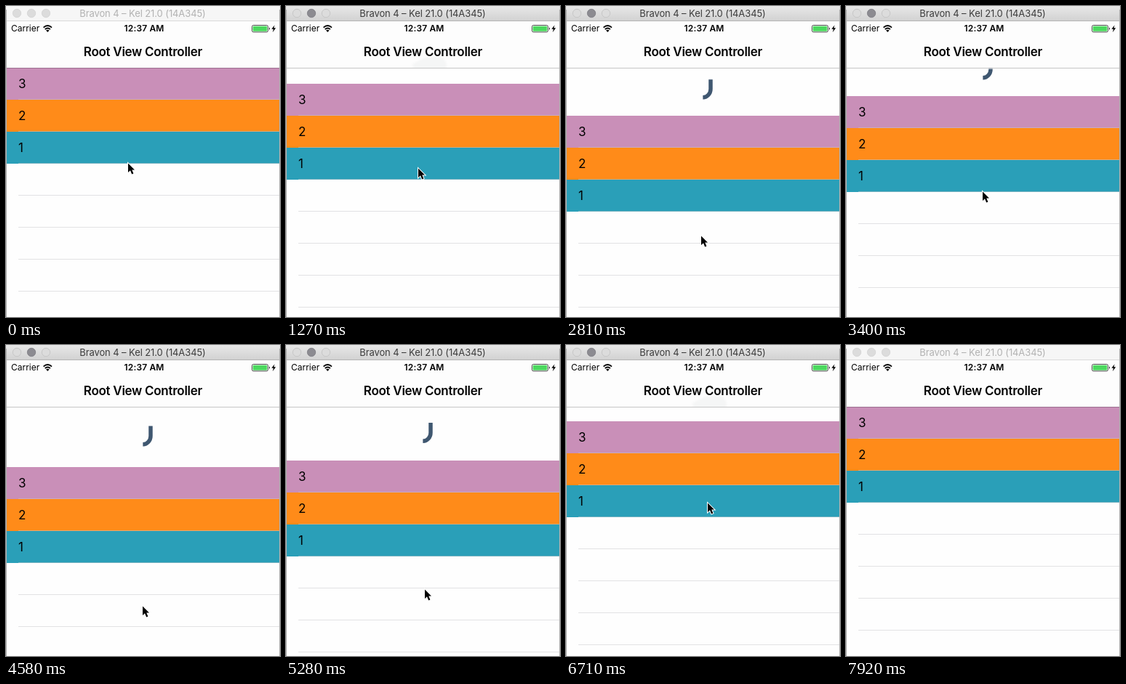
An HTML page for the animation above (8.02 s loop, 377 px wide and 428 px high).

```html
<!DOCTYPE html>
<html lang="en">
<head>
<meta charset="utf-8">
<title>Pull to refresh</title>
<style>
  html, body { margin: 0; width: 100%; height: 100%; overflow: hidden; background: #fefefe; }
  svg { display: block; width: 100vw; height: 100vh; }
  text { font-family: Inter, Roboto, sans-serif; fill: #000; }
  .mid { text-anchor: middle; }
  #window { font-size: 13px; letter-spacing: -.1px; fill: #b2b2b2; }
  .light { fill: #dcdcdc; stroke: #d2d2d2; stroke-width: .8; }
  .active #bar { fill: url(#steel); }
  .active #edge { fill: #b4b4b4; }
  .active #window { fill: #3c3c3c; }
  .active .light { stroke: #c2c2c2; }
  .active #mini { fill: #8c8b91; stroke: #7b7a80; }
</style>
</head>
<body>
<svg id="stage" viewBox="0 0 377 428" preserveAspectRatio="none">
  <defs>
    <linearGradient id="steel" x2="0" y2="1">
      <stop stop-color="#e8e8e8"/><stop offset="1" stop-color="#d2d2d2"/>
    </linearGradient>
    <filter id="soft"><feGaussianBlur stdDeviation="1.5"/></filter>
    <clipPath id="navClip"><rect y="21" width="377" height="64"/></clipPath>
    <path id="hook" pathLength="1" d="M188.4-3.3A10.6 11.5 0 0 0 199-14.8V-28.6"/>
  </defs>

  <rect width="377" height="428" fill="#fefefe"/>
  <g id="spinner" fill="none" stroke-width="5.4">
    <use href="#hook" stroke="#d9dee5"/>
    <use href="#hook" stroke="#3f5770" id="ink"/>
  </g>
  <g id="table"></g>

  <rect y="21" width="377" height="64" fill="#fdfdfd"/>
  <g clip-path="url(#navClip)">
    <path id="haze" d="M174 80L187 73Q203 67 216 71L221 79V88H175Z" fill="#f5f6f6" filter="url(#soft)"/>
  </g>
  <rect y="85" width="377" height="1" opacity=".22"/>
  <text class="mid" x="188.4" y="69" font-size="17" font-weight="600" letter-spacing="-.28">Root View Controller</text>

  <text x="7" y="35.3" font-size="12">Carrier</text>
  <text class="mid" x="190.1" y="35.3" font-size="12" font-weight="600" letter-spacing=".15">12:37 AM</text>
  <g fill="none" stroke="#000" stroke-width="1.9">
    <path d="M51.6 29.6Q57.3 24.6 63 29.6M53.7 32.1Q57.3 28.9 60.9 32.1"/>
    <path d="M55 33.6Q57.3 31.9 59.6 33.6L57.3 36Z" fill="#000" stroke="none"/>
  </g>
  <rect x="338.5" y="26.5" width="22" height="9.4" rx="2" fill="none" stroke="#222" stroke-width=".8"/>
  <rect x="339.7" y="27.7" width="19.6" height="7" rx="1" fill="#4cd95f"/>
  <path d="M362 29.3Q364 31.2 362 33.1Z"/>
  <path d="M369.6 26.2L365.4 31.8H368L366.8 36.2L371.2 30.2H368.5Z"/>

  <rect id="bar" width="377" height="20" fill="#f6f6f6"/>
  <rect id="edge" y="20" width="377" height="1" fill="#dadada"/>
  <circle class="light" cx="15" cy="10" r="5.7"/>
  <circle class="light" id="mini" cx="35" cy="10" r="5.7"/>
  <circle class="light" cx="55" cy="10" r="5.7"/>
  <text class="mid" id="window" x="188" y="15">Bravon 4 – Kel 21.0 (14A345)</text>
  <path d="M.5 5V428M376.5 5V428" stroke="#b3b3b3"/>

  <path id="cursor" d="M1 1.6V14L4 11.3L6.2 16.4L8.4 15.4L6.3 10.5H10Z"
    stroke="#fff" stroke-width="2" paint-order="stroke"/>
</svg>
<script>
const $ = id => document.getElementById(id);
const LOOP = 8020, GRAB = 790, RESUME = 3630, BLUR = 7920;
const TICK = 118.3, TOP = 85, ROW = 44, FULL_PULL = 68;

// Turning points of the drag: time, pointer x, pointer y, pull
const path = [
  [0, 167, 215, 0], [590, 182, 170, 0], [GRAB, 182, 174, 0],
  [1263, 181, 222, 22], [2209, 183, 319, 68], [2564, 184, 340, 77],
  [3392, 187, 254, 39], [4576, 187, 358, 83], [4950, 189, 354, 82],
  [5878, 194, 272, 49], [7297, 194, 176, 0], [LOOP, 194, 176, 0]
];

const colors = ["#c98fb8", "#ff8b19", "#2a9fb8"];
for (let i = 0; i < 8; i++) {
  const y = i * ROW;
  const cell = colors[i] ? `<rect y="${y}" width="377" height="${ROW}" fill="${colors[i]}"/>
    <text x="17" y="${y + 28}" font-size="17">${colors.length - i}</text>` : "";
  $("table").innerHTML += cell +
    `<rect x="17" y="${y + ROW - 1}" width="360" height="1" fill="#c8c7cc" opacity=".5"/>`;
}

// The picture advances in even ticks, restarting after each pause.
function snap(t) {
  const start = t < GRAB ? 0 : t < RESUME ? GRAB : RESUME;
  return start + Math.floor((t - start) / TICK + .001) * TICK;
}

function pose(t) {
  const i = path.findIndex(p => p[0] > t);
  const a = path[i - 1], b = path[i];
  const u = (t - a[0]) / (b[0] - a[0]);
  return a.map((v, n) => Math.round(v + (b[n] - v) * u));
}

const move = (id, x, y) => $(id).setAttribute("transform", `translate(${x} ${y})`);
const show = (id, on) => $(id).setAttribute("visibility", on ? "visible" : "hidden");

function draw(t) {
  const [, x, y, pull] = pose(snap(t));
  const top = TOP + pull;
  move("table", 0, top);
  move("spinner", 0, Math.min(top - 22, (TOP + top) / 2 + 13.5));
  move("cursor", x, y);
  $("ink").setAttribute("stroke-dasharray", `${Math.min(1, pull / FULL_PULL)} 2`);
  show("spinner", pull > 0);
  show("haze", pull > 8 && pull < 30);
  show("cursor", t < BLUR);
  $("stage").classList.toggle("active", t >= GRAB && t < BLUR);
}

const begin = performance.now();
function frame() {
  draw((performance.now() - begin) % LOOP);
  requestAnimationFrame(frame);
}
frame();
</script>
</body>
</html>
```
